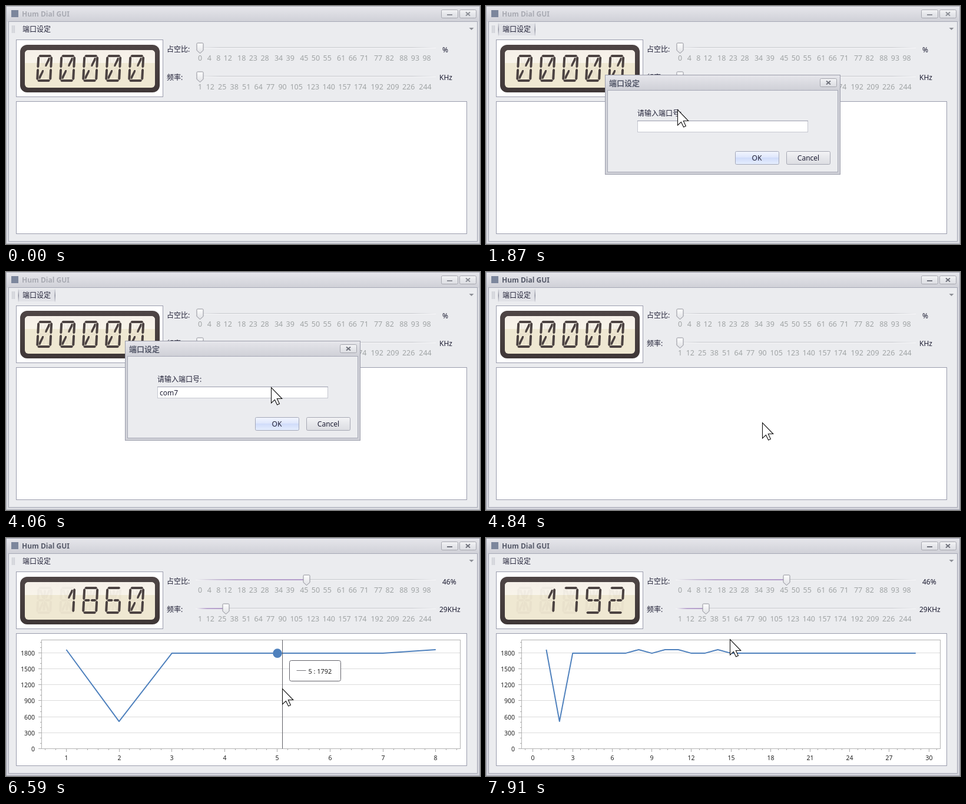
Recreate the animation shown at these times as an HTML page. Size 805x405 px, loop 8000 ms.

```html
<!DOCTYPE html>
<html lang="zh">
<head>
<meta charset="utf-8">
<title>Hum Dial GUI</title>
<style>
html, body { margin: 0; width: 100%; height: 100%; overflow: hidden; }
svg { display: block; width: 805px; height: 405px; }
text { font-family: "Noto Sans", "Noto Sans CJK SC", "Noto Sans CJK", sans-serif; font-size: 12px; fill: #1f1f35; white-space: pre; }
.scale { font-size: 12.5px; fill: #a0a4a5; text-anchor: middle; }
.axis { font-size: 10.5px; fill: #222; }
.mid { text-anchor: middle; }
.end { text-anchor: end; }
</style>
</head>
<body>
<svg id="stage" viewBox="0 0 805 405">
  <defs>
    <linearGradient id="bar" x2="0" y2="1"><stop stop-color="#e6e6eb"/><stop offset="1" stop-color="#cfd0d7"/></linearGradient>
    <linearGradient id="btn" x2="0" y2="1"><stop stop-color="#f4f4f6"/><stop offset=".5" stop-color="#e6e7eb"/><stop offset="1" stop-color="#dcdde2"/></linearGradient>
    <linearGradient id="okBtn" x2="0" y2="1"><stop stop-color="#f3f6ff"/><stop offset=".45" stop-color="#dfe7fc"/><stop offset=".5" stop-color="#d0dcfa"/><stop offset="1" stop-color="#e6eefe"/></linearGradient>
    <linearGradient id="rim" x2="0" y2="1"><stop stop-color="#4e4545"/><stop offset="1" stop-color="#3f3737"/></linearGradient>
    <linearGradient id="glass" x2="0" y2="1"><stop stop-color="#f5efe8"/><stop offset="1" stop-color="#f8f4ea"/></linearGradient>
    <linearGradient id="track" gradientUnits="userSpaceOnUse" x1="322" x2="730"><stop stop-color="#c4c6cb" stop-opacity="0"/><stop offset=".1" stop-color="#c4c6cb"/><stop offset=".9" stop-color="#c4c6cb"/><stop offset="1" stop-color="#c4c6cb" stop-opacity="0"/></linearGradient>
    <linearGradient id="fill" x2="1"><stop stop-color="#bba6cf" stop-opacity="0"/><stop offset=".35" stop-color="#bba6cf"/><stop offset="1" stop-color="#b39bca"/></linearGradient>
    <linearGradient id="thumb" x2="0" y2="1"><stop stop-color="#fff"/><stop offset="1" stop-color="#dfe0e4"/></linearGradient>
    <linearGradient id="edge" x2="0" y2="1"><stop stop-color="#8b8d9b" stop-opacity="0"/><stop offset=".5" stop-color="#8b8d9b"/><stop offset="1" stop-color="#8b8d9b" stop-opacity="0"/></linearGradient>
  </defs>
  <g id="frame"></g>
  <g id="menu"></g>
  <g id="lcd"></g>
  <g id="sliders"></g>
  <g id="chart"></g>
  <g id="dialog"></g>
  <g id="pointer"><path d="M.5 .5V27L6.4 21.4L10.6 30L14.4 28.2L10.3 19.5H18.7Z" fill="#fff" stroke="#111" stroke-width="1.1"/></g>
</svg>
<script>
const LOOP = 8000, CONNECT = 6150, STEP = 109.2;
const $ = id => document.getElementById(id);
const shown = {};

function put(id, html) {
  if (shown[id] !== html) $(id).innerHTML = shown[id] = html;
}

// Latest entry whose time has passed.
function at(keys, t) {
  let found = keys[0];
  for (const key of keys) if (key[0] <= t) found = key;
  return found;
}

const rect = (x, y, w, h, fill, stroke = 'none', r = 0) =>
  `<rect x="${x}" y="${y}" width="${w}" height="${h}" rx="${r}" fill="${fill}" stroke="${stroke}"/>`;
const line = (x1, y1, x2, y2, stroke, w = 1) =>
  `<path d="M${x1} ${y1}L${x2} ${y2}" fill="none" stroke="${stroke}" stroke-width="${w}"/>`;
const text = (x, y, s, cls = '', extra = '') => `<text x="${x}" y="${y}" class="${cls}" ${extra}>${s}</text>`;
const cross = (x, y, c) => line(x - 3.5, y - 3, x + 3.5, y + 3, c, 2) + line(x + 3.5, y - 3, x - 3.5, y + 3, c, 2);

// [time, x, y]; no position means hidden
const POINTER = [
  [0], [100, 333, 198], [220, 141, 65], [440, 92, 52], [550, 60, 44], [660, 50, 40],
  [1320, 56, 45], [1430, 110, 75], [1540, 190, 115], [1650, 260, 148], [1760, 305, 168], [1870, 325, 176],
  [2850], [3840, 335, 178], [3950, 390, 185], [4060, 450, 196], [4180, 468, 225], [4290, 469, 256],
  [7050, 452, 243], [7150, 426, 225], [7270, 419, 210], [7380, 414, 172]
];
const FADE = [[0, 0], [1220, .4], [1320, .85], [1430, 1], [4620, .6], [4740, .15], [4840, 0]];
const ACTIVE = [[0, false], [1000, true], [1220, false], [4620, true]];
const TYPED = [[0, ''], [2850, 'c'], [2960, 'co'], [3070, 'com'], [3410, 'com7']];
// [time, caret x]
const CARET = [[0, 0], [2420, 261.5], [2850, 267.5], [2960, 273.5], [3070, 284.5], [3190, 0], [3410, 291.5], [3840, 0]];

function drawFrame(active) {
  const ink = active ? '#575b6a' : '#a9abb3', glyph = active ? '#70727c' : '#8d8f97';
  put('frame',
    rect(.5, .5, 804, 404, active ? '#d3d4db' : '#dadbe0', active ? '#9d9fac' : '#abadb8') +
    rect(1, 1, 803, 26, 'url(#bar)') +
    rect(4.5, 26.5, 796, 374, '#ebecef', '#a6a8b6') +
    rect(9, 7, 12, 12, '#7c869c') +
    text(27, 18, 'Hum Dial GUI', '', `style="font-weight:700;fill:${ink}"`) +
    rect(739.5, 6.5, 28, 14, 'url(#btn)', '#a5a6ae', 2) +
    rect(770.5, 6.5, 28, 14, 'url(#btn)', '#a5a6ae', 2) +
    line(749, 15, 758, 15, glyph, 2) + cross(784.5, 13.5, glyph) +
    [10.5, 12.5, 14.5].map(x => line(x, 33, x, 46, '#c3c5cc')).join('') +
    '<path d="M786.5 37h8l-4 4z" fill="#8d8f96"/>' +
    rect(17.5, 57.5, 249, 97, '#fff', '#9a9cad') +
    rect(17.5, 162.5, 765, 225, '#fff', '#9a9cad') +
    rect(24, 66, 237, 81, 'url(#rim)', 'none', 12) +
    rect(32, 75, 221, 64, '#efe8d2', 'none', 6) +
    '<path d="M32 97V81a6 6 0 0 1 6-6H247a6 6 0 0 1 6 6V97Z" fill="url(#glass)"/>');
}

function drawMenu(hover) {
  put('menu', (hover ? rect(21, 30, 63, 20, '#e1e2e7') + rect(20.5, 28, 1.5, 24, 'url(#edge)') +
    rect(82.5, 28, 1.5, 24, 'url(#edge)') : '') + text(28, 44, '端口设定'));
}

const bar = (x1, y1, x2, y2) => {
  const n = Math.hypot(x2 - x1, y2 - y1), u = (x2 - x1) / n * 2, v = (y2 - y1) / n * 2;
  return `M${x1} ${y1}L${x1 + u - v} ${y1 + v + u}L${x2 - u - v} ${y2 - v + u}L${x2} ${y2}` +
    `L${x2 - u + v} ${y2 - v - u}L${x1 + u + v} ${y1 + v - u}Z`;
};
const SEGMENTS = {
  a: bar(2, 2, 24, 2), d: bar(2, 44, 24, 44), g: bar(2.5, 23, 12.8, 23), h: bar(13.2, 23, 23.5, 23),
  f: bar(2, 2.8, 2, 22.4), e: bar(2, 23.6, 2, 43.2), b: bar(24, 2.8, 24, 22.4), c: bar(24, 23.6, 24, 43.2),
  k: 'M21.5 5V9L16.5 20H14V17L19 5Z', l: 'M12 26V29L7 41H4.5V37L9.5 26Z',
  m: 'M4.5 5V9L9.5 20H12V17L7 5Z', n: 'M14 26V29L19 41H21.5V37L16.5 26Z',
  i: bar(13, 5, 13, 22), j: bar(13, 24, 13, 41)
};
const GLYPHS = {
  0: 'abcdefkl', 1: 'bck', 2: 'abghed', 5: 'afghcd', 6: 'afghedc', 7: 'abc', 8: 'abcdefgh', 9: 'abcdfgh', ' ': ''
};

function drawLcd(digits) {
  const ghost = Object.values(SEGMENTS).join('');
  put('lcd', [...digits].map((ch, i) =>
    `<g transform="translate(${53.4 + 39 * i} 83) skewX(-3)">` +
    `<path d="${ghost}" fill="#4b4241" opacity=".04"/>` +
    `<path d="${[...GLYPHS[ch]].map(s => SEGMENTS[s]).join('')}" fill="#4b4241"/></g>`).join(''));
}

const DUTY = { y: 70.5, marks: [0, 4, 8, 12, 18, 23, 28, 34, 39, 45, 50, 55, 61, 66, 71, 77, 82, 88, 93, 98], x: v => 329.5 + v * 3.93 };
const FREQ = { y: 119.5, marks: [1, 12, 25, 38, 51, 64, 77, 90, 105, 123, 140, 157, 174, 192, 209, 226, 244], x: v => 329.5 + (v - 1) * 1.574 };

function slider({ y, marks, x }, value) {
  const px = Math.floor(x(value)) + .5;
  return rect(322, y - .5, 408, 1, 'url(#track)') + rect(322, y + .5, 408, 1, '#f7f7f9') +
    (px > 330 ? rect(324, y - .5, px - 324, 2, 'url(#fill)') : '') +
    `<path d="M${px - 5.5} ${y - 6}q0 -1.5 1.5 -1.5h8q1.5 0 1.5 1.5v11l-5.5 5l-5.5 -5z" fill="url(#thumb)" stroke="#8e8f98"/>` +
    marks.map(m => text(x(m), y + 22.5, m, 'scale')).join('');
}

function drawSliders(on) {
  put('sliders',
    text(273, 78, '占空比:') + text(273, 126, '频率:') +
    slider(DUTY, on ? 46 : 0) + slider(FREQ, on ? 29 : 1) +
    text(741, 79, on ? '46%' : '%') + text(736, 126, on ? '29KHz' : 'KHz'));
}

const speed = i => i === 2 ? 512 : [1, 8, 10, 11, 14].includes(i) ? 1860 : 1792;
const LEFT = 60.5, RIGHT = 771.5, TOP = 173.5, BASE = 358.5;
const yOf = v => BASE - v * .0906;
const snap = v => Math.floor(v) + .5;

function tickStep(unit) {
  for (const scale of [.1, 1, 10])
    for (const m of [1, 2, 3, 5]) if (m * scale * unit >= 50) return m * scale;
  return 100;
}

function drawChart(n, cx, cy, ink) {
  if (!n) return put('chart', '');
  const unit = 627.4 / Math.max(n - 1, 1), start = n > 1 ? 102.4 : 416;
  const xOf = i => start + (i - 1) * unit;
  const argOf = x => 1 + (x - start) / unit;
  let out = '';
  for (let v = 0; v <= 2000; v += 100) {
    const y = snap(yOf(v)), major = v % 300 === 0;
    if (major) out += line(LEFT, y, RIGHT, y, '#dcdcdc') + text(49, y + 4, v, 'axis end');
    out += line(major ? 55 : 58, y, 60, y, '#a9a9a9');
  }
  const step = tickStep(unit), minor = step / 5;
  for (let j = Math.ceil(argOf(LEFT) / minor); j * minor <= argOf(RIGHT); j++) {
    const x = snap(xOf(j * minor)), major = j % 5 === 0;
    out += line(x, 359, x, major ? 364 : 361, '#a9a9a9');
    if (major) out += text(x, 378, +(j * minor).toFixed(1), 'axis mid');
  }
  out += rect(LEFT, TOP, RIGHT - LEFT, BASE - TOP, 'none', '#b3b3b3');
  const points = Array.from({ length: n }, (_, i) => `${xOf(i + 1).toFixed(1)},${yOf(speed(i + 1)).toFixed(1)}`);
  out += `<polyline points="${points.join(' ')}" fill="none" stroke="#4f81bd" stroke-width="2" stroke-linejoin="round"/>`;
  if (cy > TOP) {
    const near = Math.min(n, Math.max(1, Math.round(argOf(cx)))), bx = cx + 12.5, by = cy - 47.5;
    out += `<circle cx="${xOf(near)}" cy="${yOf(speed(near))}" r="7.8" fill="#4f81bd"/>` +
      line(cx + .5, TOP, cx + .5, BASE, ink[0]) +
      rect(bx, by, 87, 35, '#fff', '#62626a', 3) +
      line(bx + 12, by + 17, bx + 28, by + 17, ink[1]) +
      text(bx + 32, by + 22, `${near} : ${speed(near)}`, 'axis', 'style="font-size:10.9px"');
  }
  put('chart', out);
}

function drawDialog(alpha, typed, caret) {
  put('dialog', !alpha ? '' : `<g opacity="${alpha}">` +
    rect(202.5, 117.5, 399, 169, '#d0d1d8', '#9a9caa') + rect(203, 118, 398, 25, 'url(#bar)') +
    rect(206.5, 143.5, 391, 139, '#ebecef', '#a6a8b6') +
    text(209, 136, '端口设定', '', 'style="font-weight:700;font-size:13px;fill:#565a6b"') +
    rect(567.5, 123.5, 28, 14, 'url(#btn)', '#a5a6ae', 2) + cross(581.5, 130.5, '#70727c') +
    text(257, 187, '请输入端口号:') +
    rect(257.5, 195.5, 289, 19, '#fff', '#c5c7d0') + line(257, 195.5, 547, 195.5, '#9a9cad') +
    text(261, 210, typed) + (caret ? line(caret, 198, caret, 212, '#111') : '') +
    rect(423.5, 247.5, 74, 22, 'url(#okBtn)', '#a3a7b8', 2) + text(460, 263, 'OK', 'mid') +
    rect(510.5, 247.5, 74, 22, 'url(#btn)', '#a5a7b2', 2) + text(547.5, 263, 'Cancel', 'mid') + '</g>');
}

function render(t) {
  const on = t >= CONNECT;
  const n = on ? Math.round(1 + 1.75 * Math.floor((t - CONNECT) / STEP)) : 0;
  const [, x, y] = at(POINTER, t);
  drawFrame(at(ACTIVE, t)[1]);
  drawMenu(t >= 550 && !on);
  drawLcd(on ? String(speed(n)).padStart(5) : '00000');
  drawSliders(on);
  drawChart(n, x, y, t < 7050 ? ['#5f5f66', '#77777c'] : ['#d43bc6', '#4f81bd']);
  drawDialog(at(FADE, t)[1], at(TYPED, t)[1], at(CARET, t)[1]);
  $('pointer').setAttribute('visibility', x === undefined ? 'hidden' : 'visible');
  if (x !== undefined) $('pointer').setAttribute('transform', `translate(${x} ${y})`);
}

const begin = performance.now();
function tick() {
  render((performance.now() - begin) % LOOP);
  requestAnimationFrame(tick);
}
tick();
</script>
</body>
</html>
```
